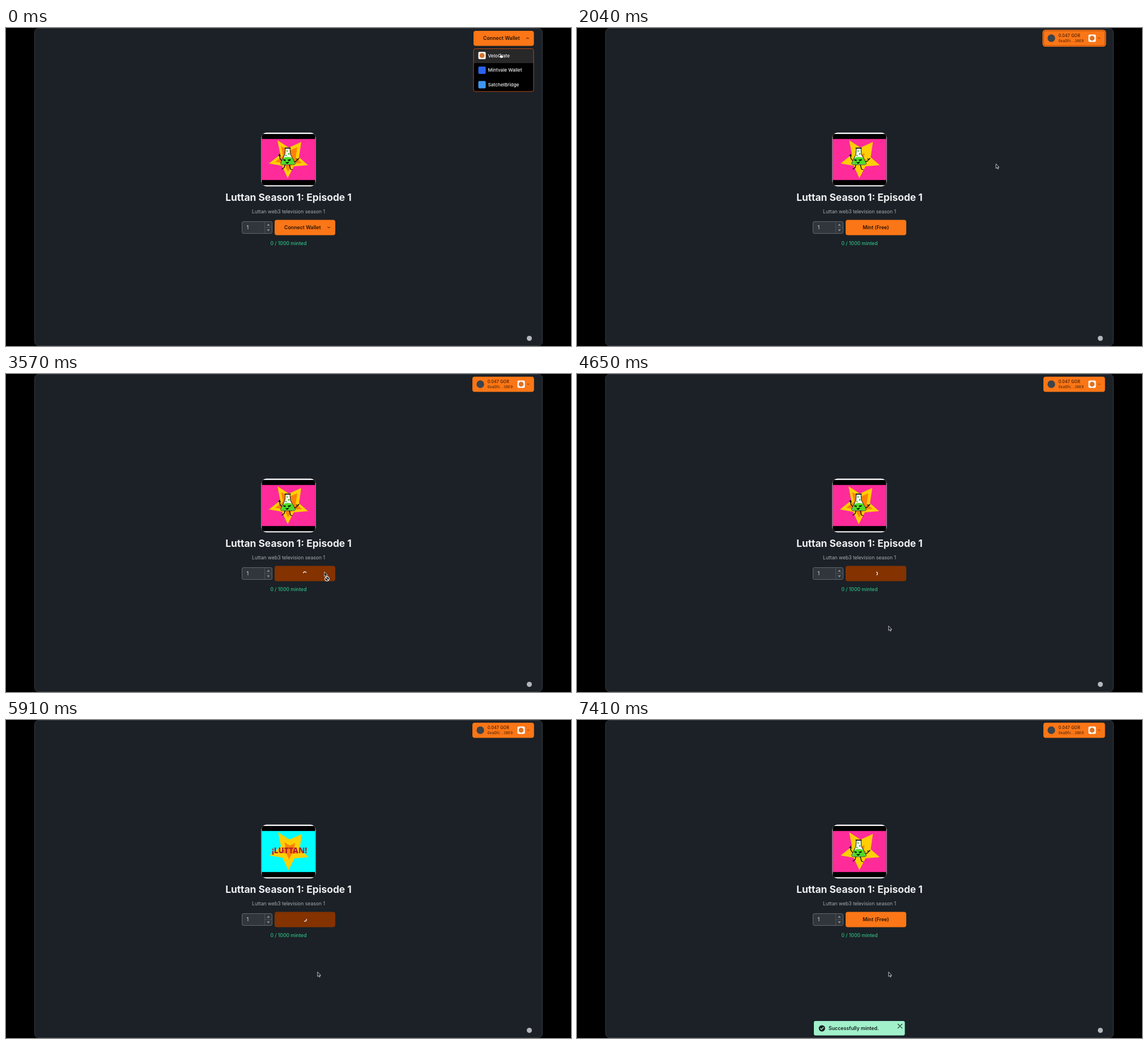
An HTML page that plays this animation: 997 by 561 pixels, repeating every 7.89 s.

```html
<!DOCTYPE html>
<html lang="en">
<head>
<meta charset="utf-8">
<title>Mint page</title>
<style>
html, body { margin: 0; width: 100%; height: 100%; overflow: hidden; background: #000; }
svg { display: block; width: 100%; height: 100%; }
text { font-family: Inter, sans-serif; white-space: pre; }
.mid { text-anchor: middle; }
.title { font-size: 17.4px; font-weight: 700; fill: #eeeff0; }
.sub { font-size: 8.6px; fill: #a9adb1; }
.btn { font-size: 8.7px; font-weight: 600; fill: #291304; letter-spacing: .05px; }
.green { font-size: 8.6px; font-weight: 500; fill: #30bd83; }
.item { font-size: 8.2px; font-weight: 500; fill: #f4f4f4; }
.bal { font-size: 7px; font-weight: 500; fill: #3d1b05; letter-spacing: .2px; }
.addr { font-size: 6px; font-weight: 500; fill: #4d2206; letter-spacing: .3px; }
.logo { font: 800 13.5px "Open Sans", sans-serif; font-stretch: condensed; fill: #b3202c; }
.line { fill: none; stroke: #000; stroke-linecap: round; stroke-linejoin: round; }
.orange { fill: #fb7616; }
.busy { fill: #833200; }
</style>
</head>
<body>
<svg viewBox="0 0 997 561" preserveAspectRatio="none">
  <defs>
    <clipPath id="card"><rect x="450.5" y="184.5" width="96" height="95" rx="9"/></clipPath>
    <path id="star" d="M479 198L499 211 521 201 517 228 533 242 508 244 497 265 487 243 464 239 484 223Z"/>
    <path id="chevron" class="line" d="M-1.8-.9L0 .9 1.8-.9"/>
    <g id="purse">
      <rect x="-6.5" y="-6.5" width="13" height="13" rx="2" fill="#fff"/>
      <circle r="4.4" fill="#d9742a"/>
    </g>
  </defs>

  <rect width="997" height="561"/>
  <rect x="50.5" y=".5" width="896" height="560" rx="7" fill="#1b2127" stroke="#343a40"/>
  <circle cx="923.5" cy="547.5" r="4.5" fill="#b4b7ba"/>

  <!-- header -->
  <g id="connect">
    <rect class="orange" x="825" y="5" width="106.5" height="26.5" rx="4"/>
    <text class="btn" x="842" y="21.3">Connect Wallet</text>
    <use id="arrow" href="#chevron"/>
  </g>
  <g id="menu">
    <rect x="825" y="36.5" width="106" height="75.5" rx="3"/>
    <path d="M825 62V39.5a3 3 0 0 1 3-3H928a3 3 0 0 1 3 3V62Z" fill="#282828"/>
    <rect x="825" y="36.5" width="106" height="75.5" rx="3" fill="none" stroke="#b54a16"/>
    <use href="#purse" x="840" y="48.5"/>
    <rect x="833.5" y="68" width="13" height="13" rx="2" fill="#2a63ee"/>
    <rect x="833.5" y="93.5" width="13" height="13" rx="2" fill="#3f98f4"/>
    <text class="item" x="850.5" y="51.5">VeloCrate</text>
    <text class="item" x="850.5" y="77.3">Mintvale Wallet</text>
    <text class="item" x="850.5" y="103">SatchelBridge</text>
  </g>
  <g id="wallet">
    <g id="ring">
      <rect class="orange" x="821.5" y="3" width="112" height="30" rx="5.5"/>
      <rect x="823.3" y="4.8" width="108.4" height="26.4" rx="4" fill="none" stroke="#a9480c"/>
    </g>
    <rect class="orange" x="823" y="4.7" width="108.7" height="26.8" rx="4" id="face"/>
    <circle cx="837" cy="18" r="6.7" fill="#3b444c"/>
    <text class="bal" x="849.7" y="16.4">0.047 GOR</text>
    <text class="addr" x="849.7" y="25.2">0xaDfc...38E9</text>
    <use href="#purse" x="909" y="18"/>
    <use href="#chevron" transform="translate(921.5 18) scale(.8)" opacity=".7"/>
  </g>

  <!-- artwork -->
  <g clip-path="url(#card)">
    <rect x="450" y="184" width="97" height="96" fill="#f1f1f3"/>
    <rect x="451.3" y="187" width="94.4" height="90.3"/>
    <rect id="backdrop" x="451.3" y="195.8" width="94.4" height="72.4"/>
    <g id="stars">
      <use href="#star" fill="#ffcf05"/>
      <use id="core" href="#star" fill="#ff8208"/>
    </g>
    <g id="flask">
      <path class="line" stroke-width="1.3" d="M487 234Q482 231 483 224M481 225l2-2 1 3M508 236Q513 236 515 231M512.5 231l2.5 1 2-2M492 241l-1 5-4 3M500 241l2 8 3 1"/>
      <path d="M493 212H501L502 223 510 238Q511 241 507 241H488Q484 241 485 238L492 223Z" fill="#f6fff2" stroke="#111"/>
      <path d="M490 229Q497 226 505 229L509.3 238Q509.8 240.4 507 240.4H488Q485.3 240.4 486 238Z" fill="#4ddb27"/>
      <path d="M491.5 211.7H502.5" stroke="#111" stroke-width="1.5"/>
      <g fill="#38b62c"><circle cx="496" cy="217" r="1.3"/><circle cx="499" cy="222" r="1.5"/><circle cx="494" cy="225" r="1.2"/></g>
      <path d="M489 231.5l5 1-1 2-3-.6ZM497 232.5l6-1-1.3 2.5-3.5.5Z"/>
      <path d="M492.5 236Q496 238 499.5 235.5 498 240 495 239Z"/>
    </g>
    <text id="logo" class="logo mid" x="500" y="235">¡LUTTAN!</text>
  </g>

  <!-- page text -->
  <text class="title mid" x="498.5" y="304.5">Luttan Season 1: Episode 1</text>
  <text class="sub mid" x="498.5" y="326.5">Luttan web3 television season 1</text>

  <!-- mint form -->
  <g id="form">
    <rect x="416.5" y="341.5" width="53" height="21" rx="2.5" fill="#31363c" stroke="#62676c"/>
    <path d="M456.5 342V362M456.5 352H469" stroke="#4a4f55"/>
    <path d="M460.3 348.8L463 345.3 465.7 348.8ZM460.3 355.2L463 358.7 465.7 355.2Z" fill="#8a8e93"/>
    <text x="424.6" y="355.3" font-size="9" fill="#dfe0e1">1</text>
    <rect id="action" x="474" y="338.5" width="107" height="27" rx="4"/>
    <g id="ask">
      <text class="btn" x="491" y="355.2">Connect Wallet</text>
      <use href="#chevron" x="569.5" y="352"/>
    </g>
    <text id="mint" class="btn mid" x="527.3" y="355.2">Mint (Free)</text>
    <text class="green mid" x="498.5" y="383.2">0 / 1000 minted</text>
  </g>
  <g id="skeleton">
    <rect class="busy" x="445" y="338.5" width="107" height="27" rx="4"/>
    <path d="M468.8 374.8h10.8v10.6h-10.8ZM487.2 374.8h10.8v10.6h-10.8Z" fill="#5b6166"/>
    <text class="green" x="481.8" y="383.2">/</text>
    <text class="green" x="500.6" y="383.2">minted</text>
  </g>
  <path id="spinner" class="line" style="stroke:#f5eee8" stroke-width="1.4"/>

  <g id="toast">
    <rect x="418" y="531" width="160.5" height="25.6" rx="3" fill="#a1f1cb"/>
    <circle cx="432.2" cy="544" r="5.6" fill="#17201f"/>
    <path class="line" style="stroke:#a1f1cb" stroke-width="1.3" d="M429.6 544.2l1.8 1.8 3.4-3.7"/>
    <text x="444" y="547.2" font-size="8.75" font-weight="600" fill="#17201f">Successfully minted.</text>
    <path class="line" style="stroke:#17201f" stroke-width="1.1" d="M566.3 536.3l7.4 7.4M573.7 536.3l-7.4 7.4"/>
  </g>

  <g id="cursor">
    <path id="pointer" d="M0 0V8L1.9 6.4 3.2 9.2 4.6 8.5 3.3 5.9H5.6Z" fill="#111" stroke="#eee" stroke-width=".8"/>
    <path id="hand" d="M1 0Q2-.7 2.4.4V3L5.5 3.8Q6.5 4.2 6.2 5.5L5.5 8H1.6L-.7 4.9Q-.5 3.8.8 4.7Z" fill="#fff" stroke="#111" stroke-width=".6"/>
    <g id="barred" fill="none">
      <circle cx="4.7" cy="12.3" r="3.8" fill="#111" stroke="#eee" stroke-width="1.3"/>
      <path d="M2 9.6L7.4 15" stroke="#eee" stroke-width="1.2"/>
    </g>
  </g>
</svg>
<script>
const LOOP = 7890, STEP = 30;
const CONNECTED = 1000, READY = 1710, MINTING = 2700, DONE = 6990;
const $ = id => document.getElementById(id);
const show = (id, on) => $(id).style.display = on ? '' : 'none';
const move = (id, value) => $(id).setAttribute('transform', value);
const within = (t, a, b) => t >= a && t < b;
const progress = (t, a, b) => Math.min(1, Math.max(0, (t - a) / (b - a)));
const ease = p => p * p * (3 - 2 * p);

// cursor moves: start, end, destination
const moves = [[570, 960, 739.3, 239.7], [2160, 2580, 561.8, 349], [3600, 3720, 549.8, 444.5]];

function cursorAt(t) {
  let x = 871, y = 45;
  for (const [a, b, toX, toY] of moves) {
    const p = ease(progress(t, a, b));
    x += (toX - x) * p;
    y += (toY - y) * p;
  }
  return [x, y];
}

function drawArt(t) {
  const cyan = within(t, 5260, 6150);
  const phase = Math.floor((t + 140) % 900 / 300);
  const size = [.68, .33, .45][phase];
  $('backdrop').setAttribute('fill', cyan ? '#00ffff' : '#ff2b9a');
  move('stars', `translate(${cyan || phase === 1 ? 1.2 : 0} 0)`);
  move('core', `translate(499 230) scale(${size}) translate(-499 -230)`);
  show('flask', !cyan);
  show('logo', cyan);
}

function drawSpinner(t, cx, radius, span) {
  const mid = 260 + 1.755 * (t - 3570);
  const point = deg => {
    const a = deg * Math.PI / 180;
    return `${cx + radius * Math.cos(a)} ${352 + radius * Math.sin(a)}`;
  };
  $('spinner').setAttribute('d',
    `M${point(mid - span / 2)}A${radius} ${radius} 0 0 1 ${point(mid + span / 2)}`);
}

function draw(time) {
  const t = Math.floor(time / STEP) * STEP;
  const open = t < 510;
  const connected = t >= CONNECTED;
  const loading = within(t, CONNECTED, READY);
  const minting = within(t, MINTING, DONE);

  show('menu', open);
  show('connect', !connected);
  move('arrow', `translate(920.5 18) scale(1 ${open ? -1 : 1})`);
  show('wallet', connected);
  show('ring', t < MINTING);
  show('face', t >= MINTING);

  drawArt(open ? 0 : Math.min(t, 7410));

  show('form', !loading);
  show('skeleton', loading);
  show('ask', !connected);
  show('mint', connected && !minting);
  $('action').setAttribute('class', minting ? 'busy' : 'orange');

  show('spinner', loading || minting);
  if (loading) drawSpinner(t, 498.5, 4, 150);
  else drawSpinner(t, 527.3, 3, 115);

  const slide = 1 - (1 - progress(t, DONE, 7260)) ** 3;
  show('toast', t >= DONE);
  move('toast', `translate(0 ${30 * (1 - slide)})`);
  $('toast').setAttribute('opacity', slide);

  const hand = t < 600 || within(t, 2520, MINTING);
  move('cursor', `translate(${cursorAt(t)})`);
  show('hand', hand);
  show('pointer', !hand);
  show('barred', within(t, MINTING, 3630));
}

const start = performance.now();
function tick() {
  draw((performance.now() - start) % LOOP);
  requestAnimationFrame(tick);
}
tick();
</script>
</body>
</html>
```
